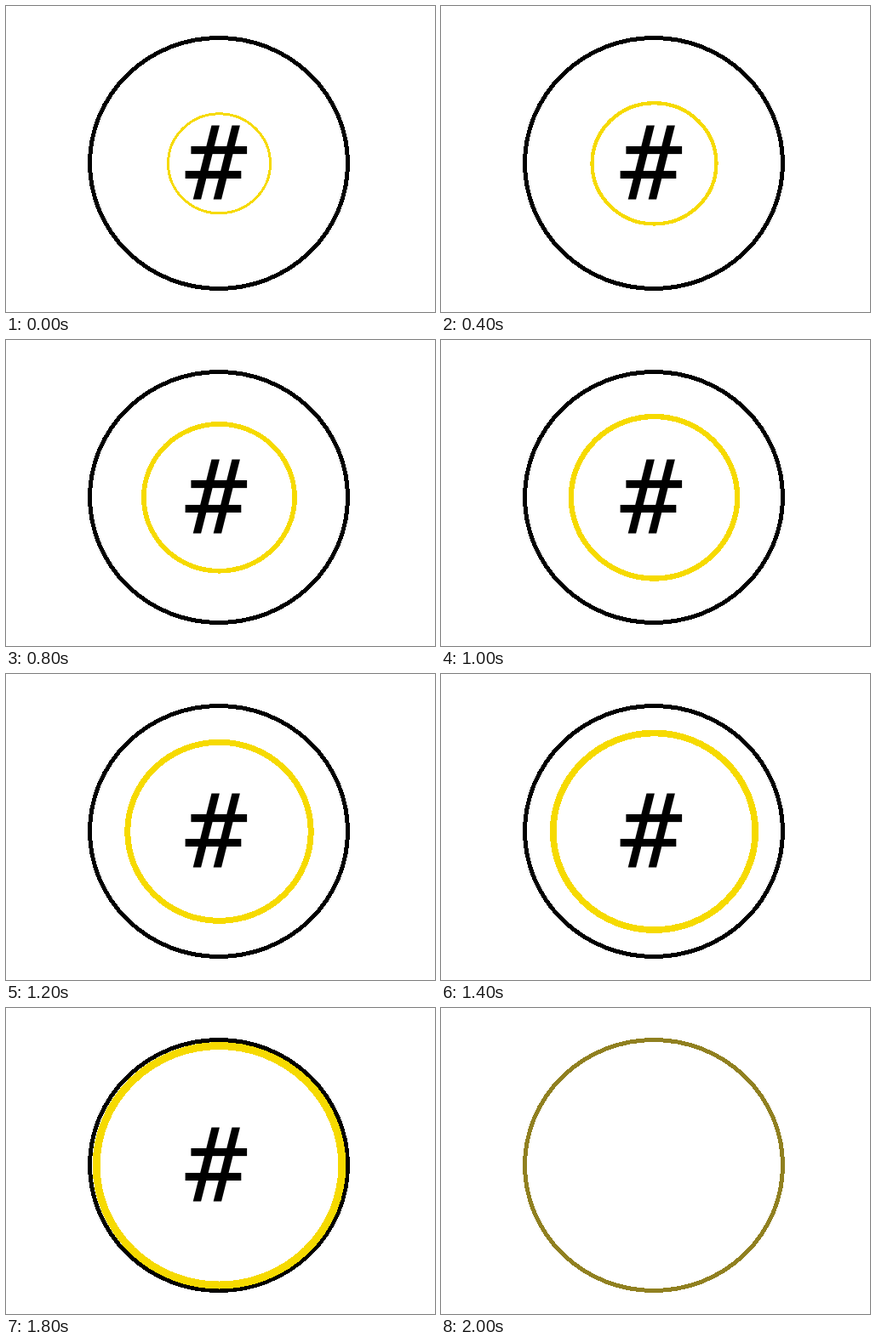
Animation of 504x360 px, one loop 3000 ms. Source, as an HTML page without scripts:

```html
<!DOCTYPE html>
<html lang="en">
<head>
<meta charset="utf-8">
<title>Growing ring</title>
<style>
  @property --n {
    syntax: "<number>";
    inherits: false;
    initial-value: 0;
  }
  html, body {
    margin: 0;
    width: 100%;
    height: 100%;
    overflow: hidden;
    background: #fff;
  }
  svg { display: block; width: 504px; height: 360px; }

  ellipse { fill: none; shape-rendering: crispEdges; }
  .rim {
    stroke: #000;
    stroke-width: 5px;
    animation: rim 3s step-end infinite;
  }
  /* Grows 5% per step: --grow is the series for e^x, x = n ln 1.05 */
  .ring {
    --x: calc(var(--n) * 0.04879);
    --grow: calc(1 + var(--x) * (1 + var(--x) / 2 * (1 + var(--x) / 3 * (1 + var(--x) / 4 * (1 + var(--x) / 5)))));
    rx: calc(60px * var(--grow));
    ry: calc(58.5px * var(--grow));
    stroke: #f6da00;
    stroke-width: calc(3px + var(--n) * 1px / 3);
    animation: count 3s infinite, ring 3s step-end infinite;
  }
  .sign {
    font: 121px "DejaVu Sans Mono", monospace;
    text-anchor: middle;
    animation: sign 3s step-end infinite;
  }

  @keyframes count {
    0% { --n: 0; animation-timing-function: steps(20, end); }
    66.66%, 100% { --n: 20; }
  }
  @keyframes ring {
    0% { visibility: visible; }
    63.33%, 100% { visibility: hidden; }
  }
  @keyframes rim {
    0% { stroke: #000; }
    63.33%, 100% { stroke: #908020; }
  }
  @keyframes sign {
    0% { visibility: visible; }
    66.66%, 100% { visibility: hidden; }
  }
</style>
</head>
<body>
<svg viewBox="0 0 504 360">
  <ellipse class="rim" cx="250" cy="185" rx="151.5" ry="147.5"/>
  <ellipse class="ring" cx="250.5" cy="185.3"/>
  <text class="sign" x="247" y="228">#</text>
</svg>
</body>
</html>
```
